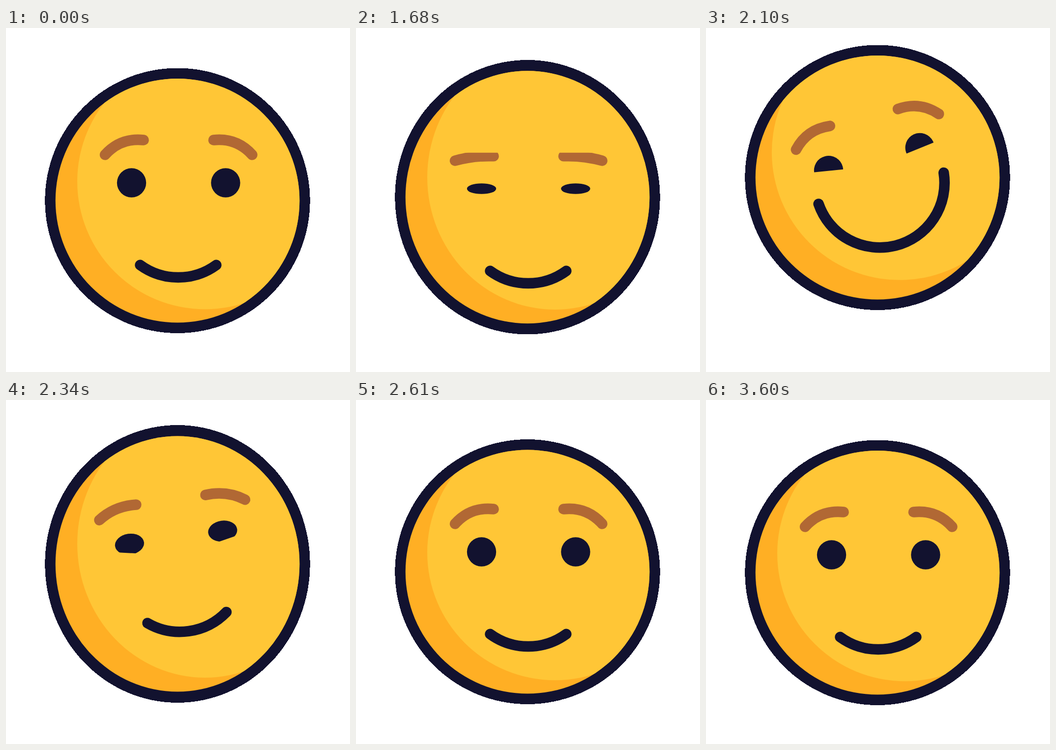
Animation of 700x700 px, one loop 4.68 s. Source, as an HTML page:

```html
<!DOCTYPE html>
<html lang="en">
<head>
<meta charset="utf-8">
<title>Laughing face</title>
<style>
  html, body { margin: 0; width: 100%; height: 100%; overflow: hidden; background: #fff; }
  svg { display: block; width: 100%; height: 100%; }
  .ink { fill: #12122f; }
  .skin { fill: #ffc636; }
  .shade { fill: #ffaf24; }
  .line { fill: none; stroke-width: 21.5; stroke-linecap: round; }
  #brow { stroke: #b16834; }
  #mouth { stroke: #12122f; }
</style>
</head>
<body>
<svg viewBox="0 0 700 700">
  <defs>
    <clipPath id="inside"><circle r="248.3"/></clipPath>
    <clipPath id="browClip"><rect id="browRect" x="150" y="200" width="200" height="200"/></clipPath>
  </defs>
  <g id="head">
    <circle class="ink" r="269.7" shape-rendering="crispEdges"/>
    <circle class="shade" r="248.3"/>
    <g clip-path="url(#inside)">
      <circle id="light" class="skin" cx="56" cy="-39" r="260"/>
    </g>
  </g>
  <g id="face">
    <g id="half">
      <g clip-path="url(#browClip)"><path id="brow" class="line"/></g>
      <ellipse id="eye" class="ink" cx="255.5" cy="315" rx="29.7" ry="29.7"/>
      <rect id="cheek" class="skin" x="-36" width="72" height="40"/>
    </g>
    <use href="#half" transform="translate(702.4 0) scale(-1 1)"/>
    <path id="mouth" class="line"/>
  </g>
</svg>
<script>
const LOOP = 4680, STEP = 30;
const CX = 349, CY = 351.3;
const el = id => document.getElementById(id);

// Smooth track through [time, value] keys, flat at every extreme
function track(...keys) {
  const slope = i => (keys[i + 1][1] - keys[i][1]) / (keys[i + 1][0] - keys[i][0]);
  const tangents = keys.map((_, i) => {
    if (i === 0 || i === keys.length - 1) return 0;
    const a = slope(i - 1), b = slope(i);
    return a * b > 0 ? 2 * a * b / (a + b) : 0;
  });
  return t => {
    if (t <= keys[0][0]) return keys[0][1];
    const n = keys.findIndex(k => k[0] > t);
    if (n < 0) return keys[keys.length - 1][1];
    const [t0, v0] = keys[n - 1], [t1, v1] = keys[n];
    const span = t1 - t0, u = (t - t0) / span, w = 1 - u;
    return v0 * w * w * (1 + 2 * u) + v1 * u * u * (3 - 2 * u)
      + span * u * w * (tangents[n - 1] * w - tangents[n] * u);
  };
}

const top_ = track([1500, 81.5], [1530, 86], [1595, 104], [1680, 65], [1740, 47], [1830, 37.5],
  [1920, 34.5], [2055, 33], [2100, 34.5], [2220, 40], [2340, 51], [2430, 101], [2520, 85],
  [2610, 80], [2650, 78], [2730, 81.5]);
const bottom = track([1500, 621], [1530, 622], [1595, 633], [1680, 623.5], [1740, 605], [1830, 583],
  [1920, 575], [2055, 572.5], [2100, 574], [2220, 588], [2340, 616], [2430, 633], [2520, 624],
  [2610, 619], [2650, 617.5], [2730, 621]);
const faceY = track([1530, 0], [1645, 16], [1680, 12], [1800, -26], [1920, -44], [2060, -50],
  [2100, -49], [2220, -47], [2340, -35], [2455, 8], [2520, 4], [2610, -6], [2730, 0]);
const faceTurn = track([1700, 0], [1950, -14.5], [2100, -14], [2220, -12.8], [2340, -8], [2460, 0]);
const lightTurn = track([1700, 0], [1950, -14.5], [2100, -14], [2310, 0]);
const smile = track([1720, 36], [1920, 85.5], [2100, 85], [2160, 82], [2340, 38], [2400, 36]);
const cheekGap = track([1740, 40], [1920, 1], [2130, 1], [2340, 18], [2460, 40]);
const blink = track([1600, 0], [1725, 1], [1740, 1], [1860, 0],
  [2295, 0], [2415, 1], [2430, 1], [2550, 0],
  [3330, 0], [3450, 1], [3480, 1], [3600, 0]);

function draw(t) {
  const hi = top_(t), lo = bottom(t);
  el('head').setAttribute('transform',
    `translate(${CX} ${(hi + lo) / 2}) scale(1 ${(lo - hi) / 539.5})`);
  el('light').setAttribute('transform', `rotate(${lightTurn(t)})`);
  el('face').setAttribute('transform',
    `translate(0 ${faceY(t)}) rotate(${faceTurn(t)} ${CX} ${CY})`);

  const shut = blink(t), drop = Math.min(1, shut / 0.71);
  el('eye').setAttribute('ry', 29.7 * (1 - 0.9 * shut));
  el('brow').setAttribute('d',
    `M201.5 258Q${233 + 7 * drop} ${223 + 24.5 * drop} 280 ${228 + 21 * drop}`);
  el('browRect').setAttribute('y', 206 + 36 * drop);

  const gap = cheekGap(t);
  el('cheek').setAttribute('transform',
    `translate(255.5 315) rotate(${8 + gap * 0.17}) translate(0 ${gap})`);

  // The mouth is a growing part of one circle
  const angle = smile(t), rad = angle * Math.PI / 180, r = 131.7;
  const dx = r * Math.sin(rad);
  const y = 375.8 - 11 * (angle - 36) / 49 + r * Math.cos(rad);
  el('mouth').setAttribute('d', `M${350.4 - dx} ${y}A${r} ${r} 0 0 0 ${350.4 + dx} ${y}`);
}

const start = performance.now();
function tick() {
  const t = (performance.now() - start) % LOOP;
  draw(Math.floor(t / STEP) * STEP);
  requestAnimationFrame(tick);
}
tick();
</script>
</body>
</html>
```
